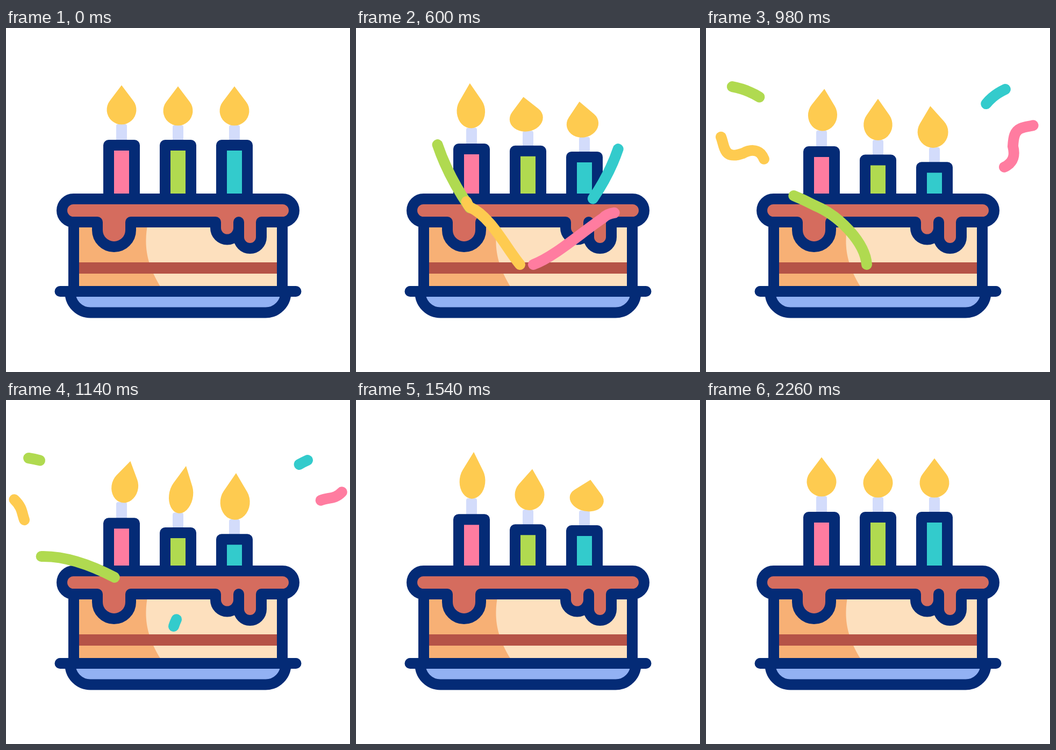
Recreate the animation shown at these times as an HTML page. Size 640 by 640 pixels, loop 2.4 s.

```html
<!DOCTYPE html>
<html lang="en">
<head>
<meta charset="utf-8">
<title>Birthday cake</title>
<style>
  html, body { margin: 0; height: 100%; overflow: hidden; background: #fff; }
  svg { display: block; width: 100%; height: 100%; }
  .line { stroke: #042b76; stroke-width: 20; stroke-linecap: round; stroke-linejoin: round; }
  #confetti path { fill: none; stroke-width: 20; stroke-linecap: round; }
</style>
</head>
<body>
<svg viewBox="0 0 640 640">
  <g id="candles"></g>
  <path fill="#fde0be" d="M126 361H514V490H126Z"/>
  <path fill="#f7b075" d="M126 361H264C256 405 260 440 293 490H126Z"/>
  <path fill="#b55347" d="M126 436H514V457H126Z"/>
  <path class="line" fill="none" d="M126 361V490M514 361V490"/>
  <path class="line" fill="#92b1f3" d="M119.5 490V492A37.5 37.5 0 0 0 157 529.5H483A37.5 37.5 0 0 0 520.5 492V490Z"/>
  <path class="line" d="M100.5 490H539.5"/>
  <path class="line" fill="#d56c5e" d="M125.5 318H514.5a21.5 21.5 0 0 1 0 43H475V389a21 21 0 0 1-42 0V361V372a21.5 21.5 0 0 1-43 0V361H232V376a31 31 0 0 1-62 0V361H125.5a21.5 21.5 0 0 1 0-43Z"/>
  <g id="confetti"></g>
</svg>
<script>
const LOOP = 2400;
const PINK = '#ff7ca0', GREEN = '#b0da50', TEAL = '#33cbcc', YELLOW = '#fecb50';

const clamp = v => Math.min(1, Math.max(0, v));
const smooth = p => (1 - Math.cos(Math.PI * clamp(p))) / 2;
const easeOut = p => 1 - (1 - clamp(p)) ** 3;

function add(parent, tag, attrs) {
  const el = document.createElementNS('http://www.w3.org/2000/svg', tag);
  for (const key in attrs) el.setAttribute(key, attrs[key]);
  return parent.appendChild(el);
}

// dip: depth, then start and end of sinking, start and end of rising
// flicker rows: time, angle, width scale, height scale
const candles = [
  { x: 215, color: PINK, base: 179.5, dip: [12, 100, 1000, 1000, 1900], flicker: [
    [0, 0, 1, 1], [340, -9.7, .96, 1.07], [460, -1, .9, 1.19], [820, -4.5, 1.07, 1.07],
    [1140, 12, .9, 1.08], [1540, 2.7, .87, 1.19], [1760, 0, 1, 1]] },
  { x: 320, color: GREEN, base: 181.5, dip: [29, 236, 1110, 1270, 2200], flicker: [
    [0, 0, 1, 1], [340, -4.5, 1.12, .88], [820, -10, 1.14, .89], [1140, 9.7, .81, 1.22],
    [1540, 6, 1, 1.05], [1760, .7, .94, 1.08], [2260, 0, 1, 1]] },
  { x: 425, color: TEAL, base: 181.5, dip: [41.3, 170, 1000, 1200, 1990], flicker: [
    [0, 0, 1, 1], [340, -.9, 1.1, .89], [820, -13.5, 1.07, .94], [1140, 2, 1, 1.19],
    [1540, 11, 1.16, .81], [1760, 3.4, .9, 1.17], [2160, 0, 1, 1]] },
];

for (const c of candles) {
  c.group = add(document.getElementById('candles'), 'g');
  add(c.group, 'rect', { x: -10, y: c.base - 1, width: 20, height: 40, rx: 4, fill: '#d3dcfb' });
  add(c.group, 'path', { class: 'line', fill: c.color, d: 'M-24 320V218H24V320Z' });
  c.flame = add(c.group, 'path', { fill: YELLOW, d: 'M0-73L21.9-44.1A27.5 27.5 0 1 1-21.9-44.1Z' });
}

// head and tail: start time and duration along the path
const streamers = [
  { color: GREEN, head: [382, 800], tail: [477, 1049],
    d: 'M300 440C210 350 160 260 143 187C135 155 112 132 81 119C68 113 55 110 42 108' },
  { color: TEAL, head: [358, 800], tail: [421, 1103],
    d: 'M320 440C420 370 480 270 496 195C502 170 515 144 533 129C541 122 550 117 561 112' },
  { color: YELLOW, head: [494, 786], tail: [725, 786],
    d: 'M305 440C280 410 250 350 213 334C200 326 206 292 178 282C158 278 152 290 136 286C110 280 115 248 102 234C94 226 82 226 69 233C55 238 41 240 35 225C29 212 32 200 14 184' },
  { color: PINK, head: [473, 800], tail: [710, 809],
    d: 'M330 440C370 425 420 380 459 354C472 340 486 346 500 340C524 328 508 302 514 284C522 260 545 266 560 256C575 246 574 232 571 220C572 203 574 192 585 187C600 180 612 186 626 170' },
  { color: GREEN, head: [818, 663], tail: [1055, 480],
    d: 'M299 440C296 400 250 350 202 330C160 308 110 290 66 291C50 291 35 293 20 296' },
  { color: TEAL, head: [1135, 400], tail: [1230, 300],
    d: 'M312 421C328 370 390 330 440 312C490 294 535 288 575 290' },
];

for (const s of streamers) {
  s.path = add(document.getElementById('confetti'), 'path', { d: s.d, stroke: s.color });
  s.length = s.path.getTotalLength();
}

function pose(rows, t) {
  const i = rows.findIndex(row => row[0] > t);
  if (i < 0) return rows[rows.length - 1];
  const a = rows[i - 1], b = rows[i];
  const k = smooth((t - a[0]) / (b[0] - a[0]));
  return a.map((v, n) => v + (b[n] - v) * k);
}

function draw(t) {
  for (const c of candles) {
    const [depth, down, low, up, top] = c.dip;
    const y = depth * (smooth((t - down) / (low - down)) - smooth((t - up) / (top - up)));
    const [, angle, sx, sy] = pose(c.flicker, t);
    c.group.setAttribute('transform', `translate(${c.x} ${y})`);
    c.flame.setAttribute('transform', `translate(0 ${c.base}) rotate(${angle}) scale(${sx} ${sy})`);
  }
  for (const { path, length, head, tail } of streamers) {
    const at = ([start, duration]) => length * easeOut((t - start) / duration);
    const from = at(tail), size = at(head) - from;
    path.style.display = size > .5 ? '' : 'none';
    path.setAttribute('stroke-dasharray', `${Math.max(size, 0)} 2000`);
    path.setAttribute('stroke-dashoffset', -from);
  }
}

const begin = performance.now();
function tick() {
  draw((performance.now() - begin) % LOOP);
  requestAnimationFrame(tick);
}
tick();
</script>
</body>
</html>
```
